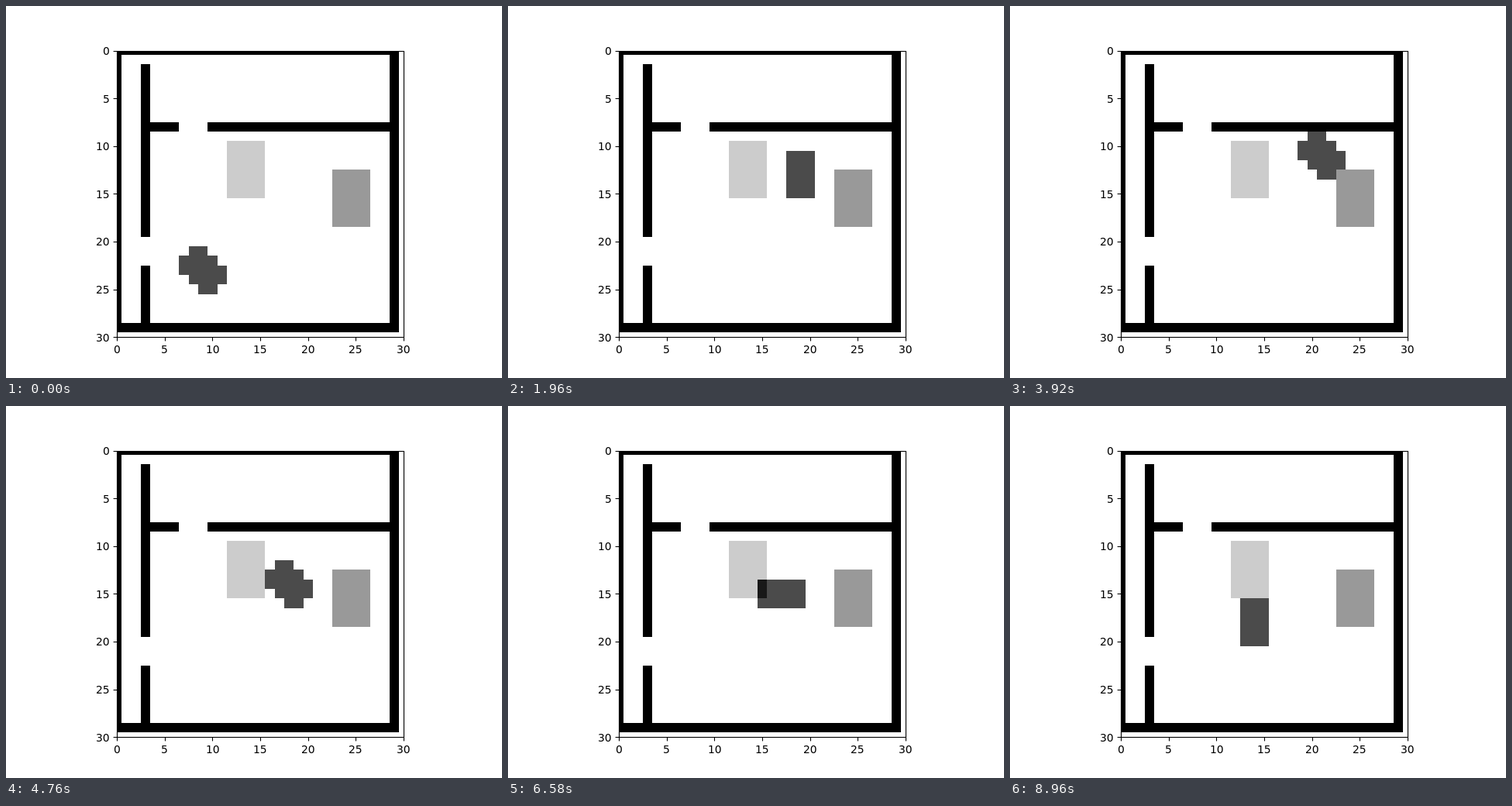
These frames come from a looping animation (640 px wide and 480 px high, 9100 ms). An HTML page with a canvas:

```html
<!DOCTYPE html>
<html lang="en">
<head>
<meta charset="utf-8">
<title>Block moving through a room</title>
<style>
  html, body { margin: 0; overflow: hidden; background: #fff; }
  canvas { display: block; }
</style>
</head>
<body>
<canvas id="stage" width="640" height="480"></canvas>
<script>
const ctx = document.getElementById('stage').getContext('2d');
const STEP = 140, STEPS = 64, LOOP = 9100;

// Fills a block of grid cells; cell n is centred on axis value n
function cells(column, row, width, height, color) {
  const x = c => Math.round(143 + 12.34 * (c - .5));
  const y = r => Math.round(56.95 + 12.34 * (r - .5));
  ctx.fillStyle = color;
  ctx.fillRect(x(column), y(row), x(column + width) - x(column), y(row + height) - y(row));
}

function drawRoom() {
  cells(0, 0, 30, 30, '#000');
  cells(1, 1, 28, 28, '#fff');
  cells(3, 2, 1, 27, '#000');
  cells(4, 8, 25, 1, '#000');
  cells(3, 20, 1, 3, '#fff'); // doors
  cells(7, 8, 3, 1, '#fff');
  cells(12, 10, 4, 6, '#ccc');
  cells(23, 13, 4, 6, '#999');
}

// Each pass climbs the diagonal to its top column, then turns on the spot
const passes = [
  { from: 0, column: 9, top: 19, turn: 1 },
  { from: 15, column: 11, top: 19, turn: 3 },
  { from: 25, column: 19, top: 21, turn: 1 },
  { from: 33, column: 18, top: 21, turn: 1 },
  { from: 36, column: 13, top: 21, turn: 1 },
  { from: 41, column: 12, top: 19, turn: 0 },
  { from: 49, column: 14, top: 21, turn: 3 },
  { from: 62, column: 13, top: 21, turn: 2 }
];

function drawBlock(step) {
  const pass = passes.findLast(p => p.from <= step);
  const reach = pass.column + step - pass.from;
  const x = Math.min(reach, pass.top), y = 32 - x;
  const angle = (pass.turn - (reach - x)) * Math.PI / 4;
  const cos = Math.cos(angle), sin = Math.sin(angle);
  ctx.globalCompositeOperation = 'difference'; // overlaps add up to a darker grey
  for (let dy = -2; dy <= 2; dy++) {
    for (let dx = -2; dx <= 2; dx++) {
      const along = Math.abs(dx * cos + dy * sin);
      const across = Math.abs(dy * cos - dx * sin);
      if (along < 2.5 && across < 1.5) cells(x + dx, y + dy, 1, 1, '#b4b4b4');
    }
  }
  ctx.globalCompositeOperation = 'source-over';
}

function line(x0, y0, x1, y1) {
  ctx.beginPath();
  ctx.moveTo(x0, y0);
  ctx.lineTo(x1, y1);
  ctx.stroke();
}

function drawAxes() {
  ctx.strokeStyle = ctx.fillStyle = '#000';
  ctx.lineWidth = 1.11;
  ctx.font = '13.89px "DejaVu Sans", sans-serif';
  ctx.strokeRect(143.5, 58.5, 370, 369);
  for (let v = 0; v <= 30; v += 5) {
    const x = 143.2 + 12.32 * v, y = 57.6 + 12.32 * v;
    const tickX = Math.round(x) + .5, tickY = Math.round(y) + .5;
    const width = ctx.measureText(v).width;
    line(tickX, 428, tickX, 432.4);
    line(143, tickY, 138.6, tickY);
    ctx.fillText(v, Math.round(x - width / 2), 448);
    ctx.fillText(v, Math.round(133.5 - width), Math.round(y + 5.3));
  }
}

function draw(time) {
  // The first pose lasts two steps
  const step = Math.min(STEPS - 1, Math.max(0, Math.floor(time / STEP) - 1));
  ctx.clearRect(0, 0, 640, 480);
  ctx.save();
  ctx.beginPath();
  ctx.rect(143, 58, 371, 370);
  ctx.clip();
  drawRoom();
  drawBlock(step);
  ctx.restore();
  drawAxes();
}

const start = performance.now();
function tick() {
  draw((performance.now() - start) % LOOP);
  requestAnimationFrame(tick);
}
tick();
</script>
</body>
</html>
```
